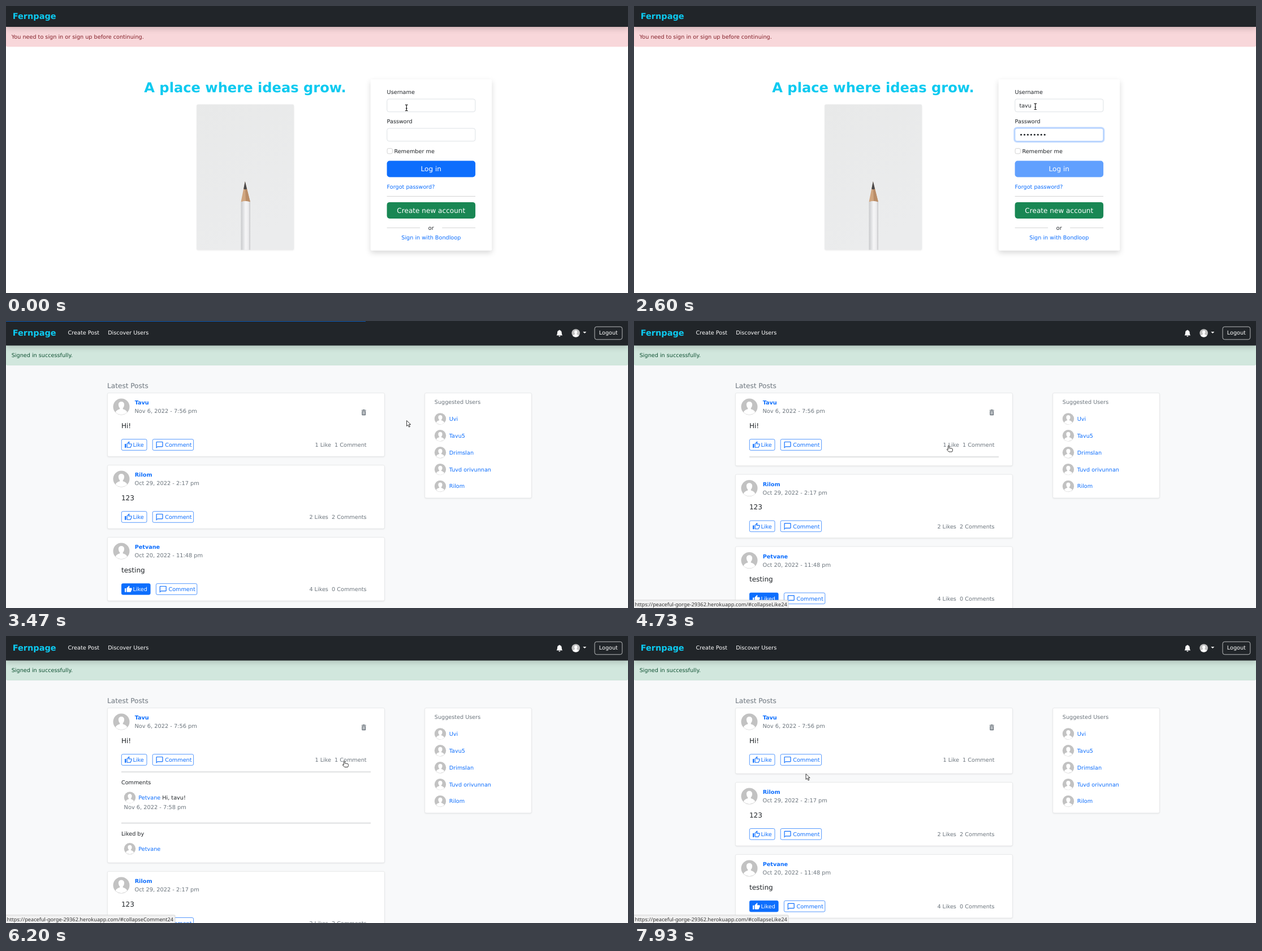
Recreate the animation shown at these times as an HTML page. Size 1100x509 px, loop 8 s.

```html
<!DOCTYPE html>
<html lang="en">
<head>
<meta charset="utf-8">
<title>Sign in and browse posts</title>
<style>
  html, body { margin: 0; width: 100%; height: 100%; overflow: hidden; background: #fff; }
  #stage { display: block; width: 1100px; height: 509px; }
  text { font: 9.67px "DejaVu Sans", sans-serif; fill: #212529; white-space: pre; text-rendering: geometricPrecision; }
  .big { font-size: 12.08px; }
  .date { font-size: 9.8px; }
  .logo { font-size: 14.5px; fill: #0dcaf0; }
  .title { font-size: 24.17px; fill: #0dcaf0; }
  .status { font: 9.2px "Noto Sans", sans-serif; fill: #333; }
  .bold { font-weight: bold; }
  .grey { fill: #6c757d; }
  .link { fill: #0d6efd; }
  .white { fill: #fff; }
  .danger { fill: #842029; }
  .success { fill: #0f5132; }
  .mid { text-anchor: middle; }
  .end { text-anchor: end; }
  .shadow { filter: drop-shadow(0 4.8px 4.8px rgba(0, 0, 0, .15)); }
  .lift { filter: drop-shadow(0 1.2px 1.2px rgba(0, 0, 0, .075)); }
</style>
</head>
<body>
<svg id="stage" viewBox="0 0 1100 509"></svg>
<script>
const LOOP = 8000, PAGE_SWITCH = 3470;
const BLUE = '#0d6efd', DARK = '#212529';
const stage = document.getElementById('stage');

// Moments at which the screen refreshes.
const TICKS = [0, 130, 330, 400, 470, 1070, 1200, 1270, 1470, 1530, 1670, 2330, 2470, 2530, 2600,
  3070, 3330, 3470, 3670, 3800, 3930, 4070, 4130, 4270, 4330, 4470, 4530, 4730, 4870, 5000, 5130,
  5270, 5330, 5670, 5800, 5930, 6200, 6330, 6600, 6670, 6800, 7070, 7200, 7330, 7400, 7530, 7730, 7930];

// [time, shape, x, y]
const POINTER = [[0, 'beam', 708.3, 180.5], [130, 'beam', 709.8, 178.3], [3470, 'arrow', 708.6, 176.6],
  [3670, 'arrow', 672, 203], [3800, 'hand', 618, 220], [3930, 'hand', 612, 220], [4070, 'hand', 580, 221],
  [4130, 'hand', 546, 221], [4270, 'hand', 551, 221], [4330, 'hand', 555, 221], [4470, 'hand', 558, 221],
  [5270, 'hand', 596, 221], [5330, 'hand', 623, 221], [6200, 'hand', 600, 221.5], [6330, 'hand', 569, 222],
  [6600, 'hand', 566, 222], [6670, 'hand', 563, 222], [6800, 'hand', 561, 222], [7200, 'hand', 590, 221],
  [7330, 'hand', 616, 219.3], [7730, 'hand', 614, 219], [7930, 'arrow', 304, 244.6]];

const ICONS = {
  bell: 'M8 16a2 2 0 0 0 2-2H6a2 2 0 0 0 2 2zm1-14.9a1 1 0 1 0-2 0A5 5 0 0 0 3 6c0 1.1-.5 6-2 7h14c-1.5-1-2-5.9-2-7 0-2.4-1.7-4.4-4-4.9z',
  thumb: 'M1 9h4v12H1zM9 21h9c.8 0 1.5-.5 1.8-1.2l3-7c.1-.3.2-.5.2-.8v-2c0-1.1-.9-2-2-2h-6.3l.9-4.6v-.3c0-.4-.1-.8-.4-1.1L14.2 1 7.6 7.6C7.2 8 7 8.4 7 9v10c0 1.1.9 2 2 2z',
  thumbHole: 'M9 9l4.3-4.3L12 10h9v2l-3 7H9z',
  bubble: 'M20 2H4c-1.1 0-2 .9-2 2v18l4-4h14c1.1 0 2-.9 2-2V4c0-1.1-.9-2-2-2zm0 14H6l-2 2V4h16z',
  bin: 'M6 19c0 1.1.9 2 2 2h8c1.1 0 2-.9 2-2V7H6zM19 4h-3.5l-1-1h-5l-1 1H5v2h14zM9 9h2v9H9zM13 9h2v9h-2z'
};

const POSTS = [
  { name: 'Tavu', date: 'Nov 6, 2022 - 7:56 pm', body: 'Hi!', counts: '1 Like\u00a0\u00a01 Comment', own: true },
  { name: 'Rilom', date: 'Oct 29, 2022 - 2:17 pm', body: '123', counts: '2 Likes\u00a0\u00a02 Comments' },
  { name: 'Petvane', date: 'Oct 20, 2022 - 11:48 pm', body: 'testing', counts: '4 Likes\u00a0\u00a00 Comments', liked: true }
];
const SUGGESTED = ['Uvi', 'Tavu5', 'Drimslan', 'Tuvd orivunnan', 'Rilom'];

const clamp = v => Math.min(1, Math.max(0, v));
const latest = (rows, t) => rows.filter(row => row[0] <= t).pop();

// CSS "ease" timing curve.
function ease(x) {
  let lo = 0, hi = 1;
  for (let i = 0; i < 20; i++) {
    const s = (lo + hi) / 2;
    if (.75 * s * (1 - s) + s ** 3 < x) lo = s; else hi = s;
  }
  return .3 * (1 - lo) ** 2 * lo + 3 * (1 - lo) * lo * lo + lo ** 3;
}
const openness = (t, opens, closes) => ease(clamp((t - opens) / 350)) - ease(clamp((t - closes) / 350));

const text = (x, y, content, cls = '') => `<text x="${x}" y="${y}" class="${cls}">${content}</text>`;
const rect = (x, y, w, h, fill, r = 0, extra = '') =>
  `<rect x="${x}" y="${y}" width="${w}" height="${h}" rx="${r}" fill="${fill}" ${extra}/>`;
const icon = (d, x, y, scale, fill) =>
  `<path d="${d}" transform="translate(${x} ${y}) scale(${scale})" fill="${fill}" fill-rule="evenodd"/>`;
const outline = (color, width = .7) => `stroke="${color}" stroke-width="${width}"`;
const card = (x, y, w, h) => rect(x, y, w, h, '#fff', 2.4, outline('#dcdddf', .6) + ' class="lift"');

const avatar = (x, y, r) => `<g transform="translate(${x} ${y}) scale(${r / 14.5})">
  <circle r="14.5" fill="#c2c2c2"/>
  <path d="M0-9.2c3.5 0 5.3 2.5 5.1 5.8-.2 2.6-1.2 4.6-2.4 5.8v1.7c3.6 1 6.4 2.4 7.6 5.6a14.5 14.5 0 0 1-20.6 0c1.2-3.2 4-4.6 7.6-5.6V2.4c-1.2-1.2-2.2-3.2-2.4-5.8C-5.3-6.7-3.5-9.2 0-9.2z" fill="#fff"/></g>`;

function header(height, message, kind, fill, border) {
  return rect(0, height, 1100, 34.7, fill, 2.4, outline(border, .6))
    + text(9.7, height + 20.6, message, kind)
    + rect(0, 0, 1100, height, DARK, 0, 'class="shadow"')
    + text(11.7, height / 2 + 4, 'Fernpage', 'logo bold');
}

function pointer(t) {
  const [, shape, x, y] = latest(POINTER, t);
  const art = {
    beam: `<path d="M-2.3-5.2h1.6l.7.6.7-.6h1.6M-2.3 5.2h1.6l.7-.6.7.6h1.6M0-4.6v9.2M-1.3 1.2h2.6" fill="none" ${outline('#222', 1.2)}/>`,
    arrow: `<path d="M0 0v9.8l2.3-2.1 1.8 3.8 1.7-.8-1.8-3.7h3.2z" fill="#fff" ${outline('#222', .9)}/>`,
    hand: `<path d="M-2.6 1a1 1 0 0 1 2 0v3.4l4.4.5q1.7.3 1.6 2V8q0 1.5-1 3H-1.2L-4.5 7.5q-.3-1.4 1.1-1.1l.8.7z" fill="#fff" ${outline('#222', .9)}/>`
  };
  return `<g transform="translate(${x} ${y})">${art[shape]}</g>`;
}

function field(y, focus) {
  return rect(672.5, y - 1.2, 158.7, 25.2, 'none', 4.8, outline(BLUE, 2.4) + ` opacity="${.25 * focus}"`)
    + rect(673.8, y, 156.1, 22.7, '#fff', 3.6, outline(focus > .5 ? '#86b7fe' : '#ced4da'));
}

function photo() {
  return `<defs>
      <linearGradient id="paper" x2=".4" y2="1"><stop stop-color="#e8e9e9"/><stop offset="1" stop-color="#ebeced"/></linearGradient>
      <linearGradient id="barrel"><stop stop-color="#c9cacc"/><stop offset=".25" stop-color="#dfe0e2"/>
        <stop offset=".5" stop-color="#f6f6f7"/><stop offset=".8" stop-color="#ececee"/><stop offset="1" stop-color="#c6c7c9"/></linearGradient>
    </defs>`
    + rect(337.2, 174.6, 172, 258, 'url(#paper)', 2.4, 'class="lift"')
    + `<path d="M422.8 311L415.5 347.5Q423.5 344.5 432 347.5z" fill="#d0a680"/>
      <path d="M423 323L424 346 432 347.5 426 324z" fill="#b98d68"/>
      <path d="M422.8 311L420.2 324.5Q423 326 426 324.5z" fill="#48484b"/>
      <path d="M415.5 347.5Q423.5 344.5 432 347.5V432.6H415.5z" fill="url(#barrel)"/>`;
}

function loginPage(t) {
  const typed = t >= 1270 ? 4 : t >= 1200 ? 2 : t >= 1070 ? 1 : 0;
  const dots = t >= 2470 ? 8 : t >= 2330 ? 7 : t >= 1670 ? 1 : 0;
  const swap = clamp((t - 1400) / 130);
  const busy = t < 3330 ? clamp((t - 2400) / 200) : 0;
  let out = header(37, 'You need to sign in or sign up before continuing.', 'danger', '#f8d7da', '#f5c2c7')
    + text(423, 153.4, 'A place where ideas grow.', 'title bold mid') + photo()
    + rect(644.7, 130, 214.5, 303.8, '#fff', 2.4, 'class="shadow"')
    + text(673.6, 155.5, 'Username') + field(165, clamp((t - 300) / 150) - swap)
    + text(681.4, 179.6, 'tavu'.slice(0, typed))
    + text(673.6, 207.7, 'Password') + field(217, swap);
  for (let i = 0; i < dots; i++) out += `<circle cx="${684.6 + 5.95 * i}" cy="228.2" r="1.55" fill="${DARK}"/>`;
  out += rect(674.1, 252.6, 9.3, 9.3, '#fff', 2.4, outline('#bfbfbf'))
    + text(686.4, 260.6, 'Remember me')
    + rect(673.6, 274.5, 156.5, 29, BLUE, 4.8, `opacity="${1 - .35 * busy}"`)
    + text(751.8, 292.6, 'Log in', 'big white mid')
    + text(673.6, 323.8, 'Forgot password?', 'link')
    + rect(673.6, 337, 156.5, .8, '#c8c9ca')
    + rect(673.6, 347.9, 156.5, 29, '#198754', 4.8)
    + text(751.8, 366.7, 'Create new account', 'big white mid')
    + rect(673.6, 392.9, 58.6, .8, '#c8c9ca') + rect(771.2, 392.9, 58.9, .8, '#c8c9ca')
    + text(751.8, 396.5, 'or', 'mid')
    + text(751.8, 414.2, 'Sign in with Bondloop', 'link mid');
  if (t >= 3070) out += rect(0, 0, t < 3330 ? 110 : 370, 1, '#0d5cba');
  return out;
}

function postCard(post, y, extra) {
  const shift = post.liked ? 6.2 : 0;
  const likeColor = post.liked ? '#fff' : BLUE;
  const thumb = ICONS.thumb + (post.liked ? '' : ICONS.thumbHole);
  return card(179.4, y, 490, 112.6 + extra)
    + avatar(204, y + 24.4, 14.5)
    + text(227.7, y + 20.6, post.name, 'bold link')
    + text(227.5, y + 35.4, post.date, 'date grey')
    + text(203.9, y + 62.2, post.body, 'big')
    + (post.own ? icon(ICONS.bin, 625.9, y + 27.7, .57, '#6c757d') : '')
    + rect(204.3, y + 82, 44.7 + shift, 19.6, post.liked ? BLUE : '#fff', 2.4, outline(BLUE))
    + icon(thumb, 209.5, y + 85.2, .57, likeColor)
    + text(224.4, y + 95.4, post.liked ? 'Liked' : 'Like', post.liked ? 'white' : 'link')
    + rect(259.2 + shift, y + 82, 72.4, 19.6, '#fff', 2.4, outline(BLUE))
    + icon(ICONS.bubble, 264.3 + shift, y + 85, .604, BLUE)
    + text(281.2 + shift, y + 95.4, 'Comment', 'link')
    + text(637.6, y + 95.4, post.counts, 'grey end');
}

// Collapsible section; content is laid out from its own top edge.
function panel(y, height, label, more) {
  return `<svg x="180" y="${y}" width="489" height="${Math.max(0, height)}"><g transform="translate(-180 0)">`
    + rect(204, 9.6, 441, 2.4, '#e3e4e5')
    + text(203.9, 32.6, label) + avatar(219, 56.2, 10.2)
    + `<text x="234.3" y="59.6"><tspan class="link">Petvane</tspan>${more ? ' Hi, tavu!' : ''}</text>`
    + (more ? text(208.6, 77.2, 'Nov 6, 2022 - 7:58 pm', 'date grey') : '')
    + '</g></svg>';
}

function statusBar(t) {
  if (t < 4470) return '';
  const onComment = t >= 5330 && t < 6330;
  return `<g opacity="${t < 4530 ? .5 : 1}">`
    + rect(-2, 495, onComment ? 301 : 275, 16, '#f1f1f1', 1.5, outline('#c4c4c4'))
    + text(1.5, 505.8, `https://peaceful-gorge-29362.herokuapp.com/#collapse${onComment ? 'Comment' : 'Like'}24`, 'status') + '</g>';
}

function feedPage(t) {
  const likes = 71 * openness(t, 4670, 7035);
  const comments = 90.8 * openness(t, 5580, 7670);
  const extra = likes + comments;
  let out = rect(0, 0, 1100, 509, '#f8f9fa')
    + header(43.5, 'Signed in successfully.', 'success', '#d1e7dd', '#badbcc')
    + text(109.6, 24.2, 'Create Post', 'white') + text(180.2, 24.2, 'Discover Users', 'white')
    + icon(ICONS.bell, 972.8, 15.7, .76, '#fff')
    + avatar(1007.7, 21.5, 7.3)
    + '<path d="M1020.3 19h6l-3 3z" fill="#fff"/>'
    + rect(1041, 10.2, 48.8, 22.6, 'none', 3.6, outline('#f8f9fa'))
    + text(1065.3, 24.3, 'Logout', 'white mid')
    + text(179.1, 119.4, 'Latest Posts', 'big grey');
  POSTS.forEach((post, i) => out += postCard(post, 127.7 + 128 * i + (i && extra), i ? 0 : extra));
  out += panel(230.2, comments, 'Comments', true) + panel(230.2 + comments, likes, 'Liked by', false)
    + card(740.7, 127.7, 188.8, 186.2)
    + text(757.8, 146.7, 'Suggested Users', 'grey');
  SUGGESTED.forEach((name, i) => {
    const y = 173.4 + 29.9 * i;
    out += avatar(768, y, 10.2) + text(783.8, y + 3.4, name, 'link');
  });
  if (t < 3670) out += rect(0, 0, 636, 1, '#0d5cba');
  return out + statusBar(t);
}

let shown = -1;
function frame(now) {
  const time = now % LOOP;
  const t = TICKS.filter(tick => tick <= time).pop();
  if (t !== shown) {
    stage.innerHTML = (t < PAGE_SWITCH ? loginPage(t) : feedPage(t)) + pointer(t);
    shown = t;
  }
  requestAnimationFrame(frame);
}
frame(0);
</script>
</body>
</html>
```
